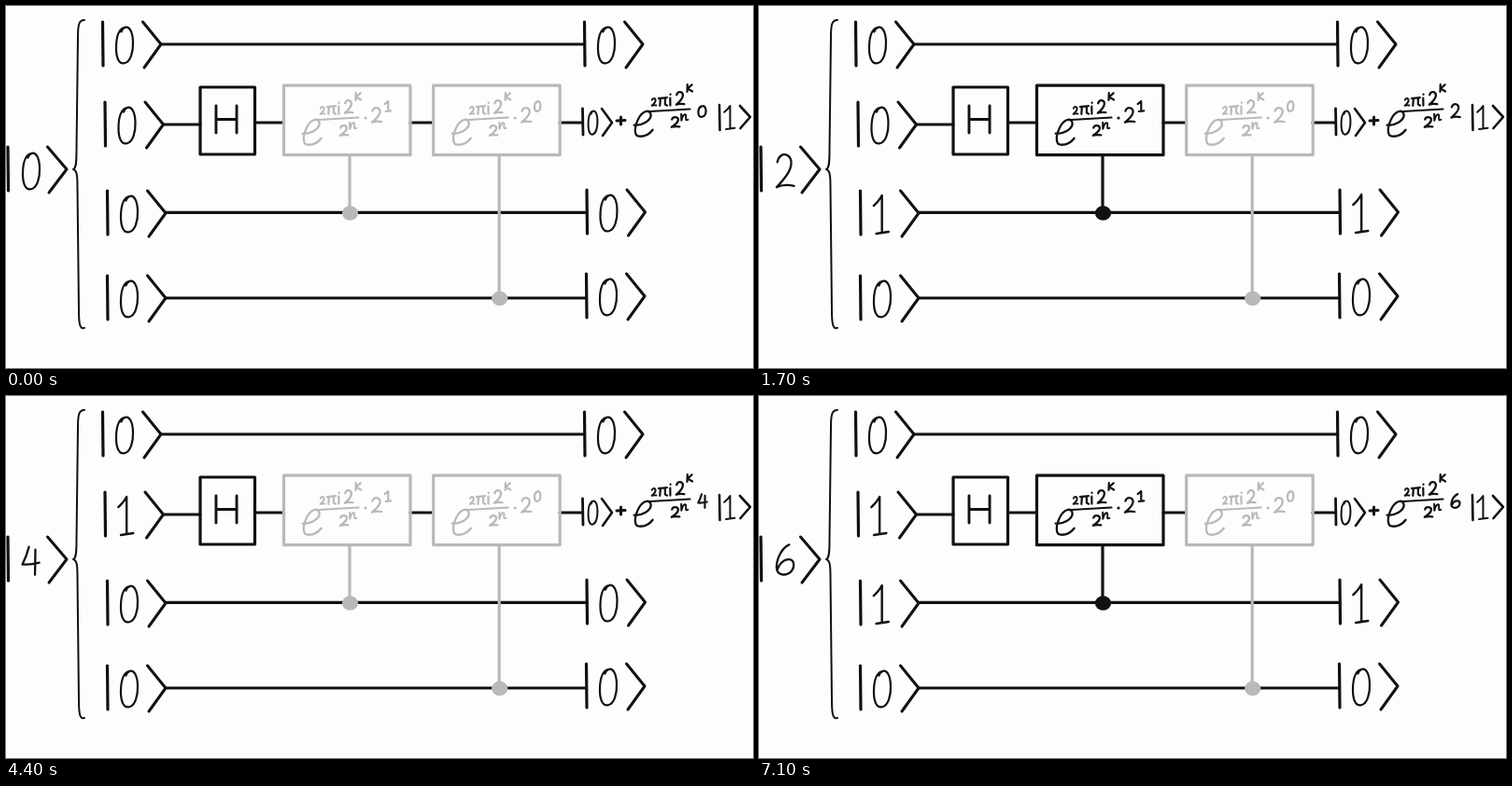
These frames come from a looping animation (800 by 388 pixels, 8 s). An HTML page with a canvas:

```html
<!DOCTYPE html>
<html lang="en">
<head>
<meta charset="utf-8">
<title>Quantum circuit</title>
<style>
html, body { margin: 0; width: 100%; height: 100%; overflow: hidden; background: #fdfcff; }
canvas { display: block; width: 800px; height: 388px; }
</style>
</head>
<body>
<canvas id="stage"></canvas>
<script>
const INK = '#111113', FADED = '#b9b8ba', PAPER = '#fdfcff';
const LOOP = 8000;
const STARTS = [0, 400, 1700, 3100, 4400, 5800, 7100];

// Handwritten strokes, each in a 100 by 100 box
const GLYPHS = {
  0: 'M40 4C14 12 4 36 5 62C7 88 24 102 50 98C82 94 97 68 95 42C94 14 76 0 54 2C44 3 36 8 32 14',
  1: 'M2 27C20 20 42 10 54 0L54 97M18 100L96 95',
  2: 'M8 23C16 4 38 -4 62 3C96 14 84 43 56 64C38 78 18 90 4 98C36 89 66 90 98 94',
  3: 'M8 11C38 -5 85 -4 88 18C90 36 58 45 36 47C74 42 100 53 95 74C88 98 34 106 3 90',
  4: 'M40 2C30 26 16 47 3 63C34 65 66 62 98 57M76 12L74 99',
  5: 'M94 3L24 5L17 43C48 31 92 35 95 64C96 92 46 106 4 92',
  6: 'M72 1C35 10 5 44 4 74C4 98 42 104 72 93C104 80 104 50 70 49C42 48 18 64 8 82',
  e: 'M3 56C42 59 86 40 89 19C87 -5 52 -2 30 25C3 60 0 98 30 99C60 100 85 87 98 74',
  p: 'M4 12C30 4 66 8 94 2M24 10L18 98M74 7L74 84L96 96',
  i: 'M45 35L48 97M52 4L53 7',
  K: 'M18 0L14 100M88 4L20 56L94 94',
  n: 'M8 10L10 98C20 48 44 8 64 16C82 24 62 72 74 90L98 86',
  H: 'M4 0L4 100M4 50L96 49M96 0L96 100'
};
for (const c in GLYPHS) GLYPHS[c] = new Path2D(GLYPHS[c]);

const canvas = document.getElementById('stage');
const ctx = canvas.getContext('2d');
const dpr = window.devicePixelRatio || 1;
canvas.width = 800 * dpr;
canvas.height = 388 * dpr;
ctx.scale(dpr, dpr);
ctx.lineCap = ctx.lineJoin = 'round';

function setColor(color) {
  ctx.strokeStyle = ctx.fillStyle = color;
}

function line(width, ...pts) {
  ctx.lineWidth = width;
  ctx.beginPath();
  for (let i = 0; i < pts.length; i += 2) ctx.lineTo(pts[i], pts[i + 1]);
  ctx.stroke();
}

function box(x, y, w, h) {
  ctx.lineWidth = 3.2;
  ctx.strokeRect(x, y, w, h);
}

function dot(x, y, rx, ry) {
  ctx.beginPath();
  ctx.ellipse(x, y, rx, ry, 0, 0, Math.PI * 2);
  ctx.fill();
}

function glyph(c, x, y, w, h, width = 2) {
  const path = new Path2D();
  path.addPath(GLYPHS[c], new DOMMatrix([w / 100, 0, 0, h / 100, x, y]));
  ctx.lineWidth = width;
  ctx.stroke(path);
}

// Ket whose bar top is at (x, y)
function ket(digit, x, y) {
  line(3.2, x, y, x + 0.5, y + 47);
  if (digit) glyph(1, x + 14, y + 5, 17, 41, 2.4);
  else glyph(0, x + 13.5, y + 5, 20, 40, 2.2);
  line(3, x + 43, y, x + 62.5, y + 24, x + 44.5, y + 49);
}

// e raised to 2 pi i 2^K / 2^n
function power(x, y) {
  glyph('e', x + 0.5, y + 30, 21, 28, 2.3);
  glyph(2, x + 20, y + 17, 5, 8);
  glyph('p', x + 27, y + 16, 10, 9, 2.2);
  glyph('i', x + 38, y + 12, 4, 13, 2.2);
  glyph(2, x + 46, y + 10, 9, 14, 2.3);
  glyph('K', x + 57, y + 2, 7, 8, 2.2);
  line(2.2, x + 18, y + 31, x + 61, y + 28.5);
  glyph(2, x + 41, y + 37, 9, 11, 2.3);
  glyph('n', x + 51, y + 33, 8, 8);
}

function phaseGate(x, exponent, controlY, active) {
  setColor(active ? INK : FADED);
  box(x, 85.2, 135.5, 74.5);
  power(x + 19, 91);
  dot(x + 87.5, 120, 1.6, 1.6);
  glyph(2, x + 94, 109, 11, 16, 2.2);
  glyph(exponent, x + 108, 102, 7, 11, 2.2);
  line(3.2, x + 70.5, 160, x + 70.5, controlY);
  dot(x + 71, controlY, 8.6, 7.8);
}

function brace() {
  ctx.lineWidth = 2;
  ctx.stroke(new Path2D('M84 15C78 15 77 20 77 34L75.5 155C75.5 168 75 174 72 175' +
    'C76 176 76.5 182 76.5 194L78 326C78 340 79 347 84 345'));
}

function total(k) {
  line(3.2, 2, 151, 2.5, 198);
  if (k === 0) glyph(0, 17, 157, 20, 40, 2.2);
  else if (k === 1) glyph(1, 20, 157, 16, 39, 2.4);
  else if (k === 4) glyph(4, 17, 161, 19, 31, 2.3);
  else glyph(k, 18, 159, 20, k === 2 ? 36 : 33, 2.3);
  line(3, 44.5, 151, 65, 175, 46, 200);
}

function output(k) {
  line(2.8, 617.5, 110, 618, 138);
  glyph(0, 623, 112, 11, 26);
  line(2.6, 638, 110, 649, 125, 639, 139);
  line(3, 654, 123, 663, 122.5);
  line(3, 658.5, 119, 658.5, 127);
  power(671.5, 82);
  if (k === 0) glyph(0, 741, 107, 9, 12, 2.2);
  else glyph(k, k === 1 ? 743 : 741, 105, k === 1 ? 7 : 10, 15, 2.2);
  line(2.6, 764, 106, 764.5, 133);
  glyph(1, 769, 107, 12, 25);
  line(2.6, 786, 107, 797, 119, 786.5, 131);
}

function draw(k) {
  const high = k >> 2 & 1, mid = k >> 1 & 1, low = k & 1;
  ctx.fillStyle = PAPER;
  ctx.fillRect(0, 0, 800, 388);
  setColor(INK);
  total(k);
  brace();

  ket(0, 103.5, 17);
  ket(high, 106, 103);
  ket(mid, 108.5, 198);
  ket(low, 108.5, 289);
  ket(0, 619.5, 17);
  ket(mid, 622, 197);
  ket(low, 621.5, 287);

  line(3.2, 166, 41, 619, 41);
  line(3.2, 169, 127, 208, 127);
  line(3.2, 267, 125, 297, 125);
  line(3.2, 433, 125, 457, 125);
  line(3.2, 593, 125, 617, 125);
  line(3.2, 171, 221.3, 622, 221.3);
  line(3.2, 171, 313, 621, 313);

  box(208, 87, 58.5, 72);
  glyph('H', 224, 107, 24, 29, 2.9);
  output(k);

  phaseGate(297.5, 1, 222, mid);
  phaseGate(457.7, 0, 313.5, low);
}

let shown = -1;
function tick(now) {
  const t = now % LOOP;
  const k = STARTS.filter(s => s <= t).length - 1;
  if (k !== shown) draw(shown = k);
  requestAnimationFrame(tick);
}
tick(0);
</script>
</body>
</html>
```
